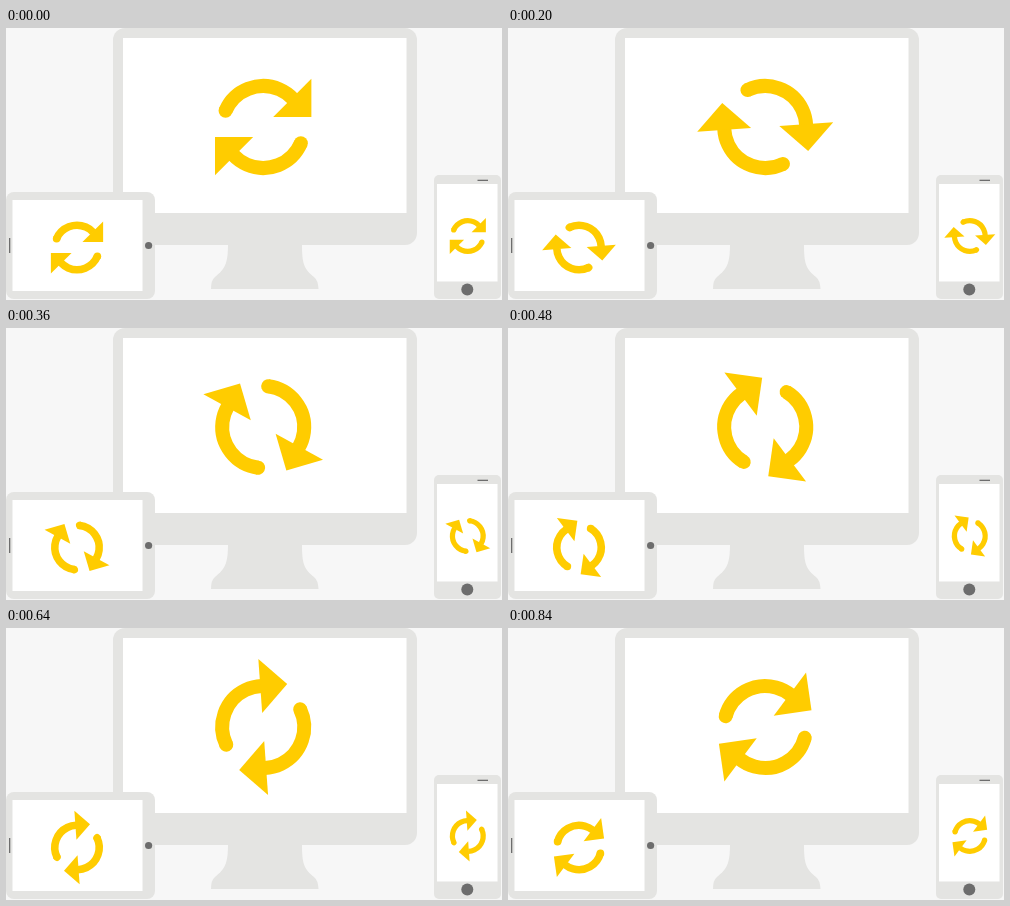
Animation, 496 px wide and 272 px high, one loop 880 ms. Source, as an HTML page with a canvas:

```html
<!DOCTYPE html>
<html lang="en">
<head>
<meta charset="utf-8">
<title>Device sync</title>
<style>
  html, body { margin: 0; width: 100%; height: 100%; overflow: hidden; background: #f7f7f7; }
  canvas { display: block; }
</style>
</head>
<body>
<canvas id="stage" width="496" height="272"></canvas>
<script>
const ctx = document.getElementById('stage').getContext('2d');
const LOOP = 880, STEP = 40;
const BODY = '#e4e4e2', DARK = '#6d6d6d', ACCENT = '#ffcc00';

function box(x, y, w, h, r, color) {
  ctx.fillStyle = color;
  ctx.beginPath();
  ctx.roundRect(x, y, w, h, r);
  ctx.fill();
}

function dot(x, y, r) {
  ctx.fillStyle = DARK;
  ctx.beginPath();
  ctx.arc(x, y, r, 0, Math.PI * 2);
  ctx.fill();
}

function drawMonitor() {
  box(107, 0, 304, 217, 12, BODY);
  box(117, 10, 283.5, 175, 0, '#fff');
  ctx.fillStyle = BODY;
  ctx.beginPath();
  ctx.moveTo(222, 216);
  ctx.bezierCurveTo(222, 236, 219, 241, 209, 249);
  ctx.quadraticCurveTo(205, 252, 205, 261);
  ctx.lineTo(312.5, 261);
  ctx.quadraticCurveTo(312, 252, 308, 249);
  ctx.bezierCurveTo(298, 241, 296, 236, 296, 216);
  ctx.fill();
}

function drawTablet() {
  box(0, 164, 149, 107, 8, BODY);
  box(6.5, 172, 130, 91, 0, '#fff');
  box(3, 210, 1.3, 15, 0, DARK);
  dot(142.6, 217.5, 3.6);
}

function drawPhone() {
  box(428, 147, 67, 124, 5, BODY);
  box(431, 156, 60.5, 97.5, 0, '#fff');
  box(471.5, 151.7, 10.5, 1.3, 0, DARK);
  dot(461.3, 261.5, 6);
}

// Two arrows, each the other turned by half a circle.
function drawSync(x, y, scale, angle) {
  ctx.save();
  ctx.translate(x, y);
  ctx.scale(scale, scale);
  ctx.rotate(angle);
  ctx.fillStyle = ctx.strokeStyle = ACCENT;
  ctx.lineWidth = 14;
  for (let i = 0; i < 2; i++) {
    const start = Math.PI * 1.13;
    ctx.beginPath();
    ctx.arc(0, 0, 41, start, Math.PI * 1.76);
    ctx.stroke();
    ctx.beginPath();
    ctx.arc(41 * Math.cos(start), 41 * Math.sin(start), 7, 0, Math.PI * 2);
    ctx.fill();
    ctx.beginPath();
    ctx.moveTo(48.2, -48.2);
    ctx.lineTo(48.2, -10);
    ctx.lineTo(10, -10);
    ctx.fill();
    ctx.rotate(Math.PI);
  }
  ctx.restore();
}

function draw(now) {
  const time = Math.floor((now % LOOP) / STEP) * STEP;
  const angle = Math.PI * time / LOOP;
  box(0, 0, 496, 272, 0, '#f7f7f7');
  drawMonitor();
  drawTablet();
  drawPhone();
  drawSync(257.2, 99, 1, angle);
  drawSync(71, 219.5, 0.542, angle);
  drawSync(461.8, 208, 0.375, angle);
}

const origin = performance.now();
function tick() {
  draw(performance.now() - origin);
  requestAnimationFrame(tick);
}
tick();
</script>
</body>
</html>
```
